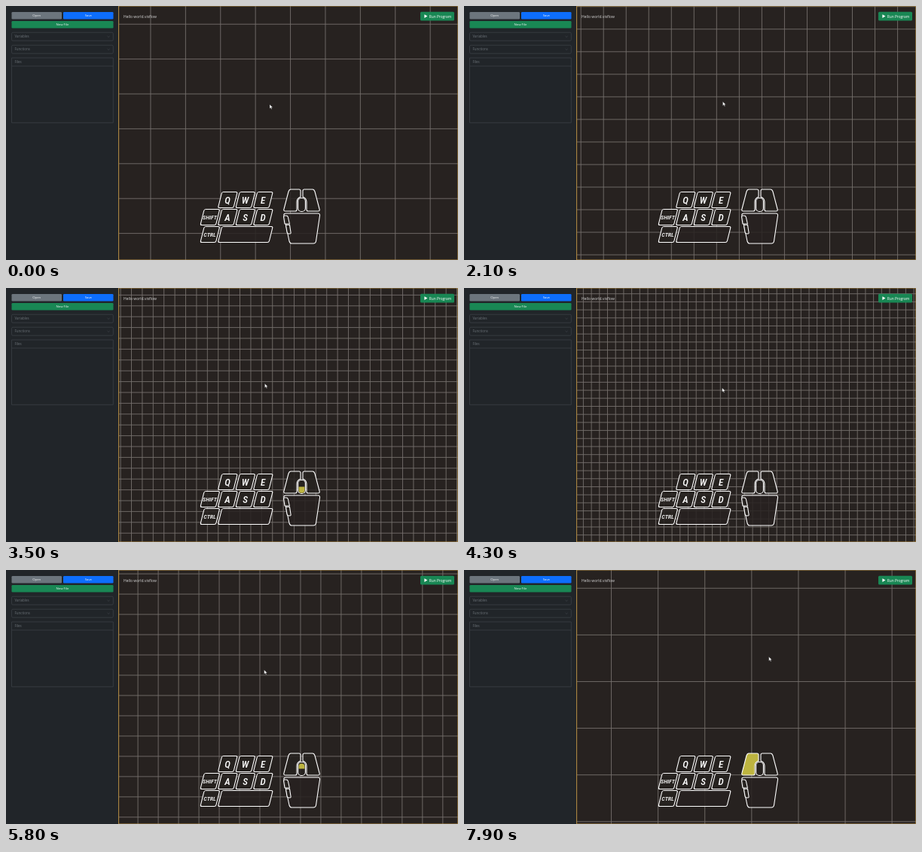
An HTML page that plays this animation: 600x338 px, repeating every 8000 ms.

```html
<!DOCTYPE html>
<html lang="en">
<head>
<meta charset="utf-8">
<title>Canvas zoom and pan</title>
<style>
html, body { margin: 0; width: 100%; height: 100%; overflow: hidden; background: #212529; }
svg { display: block; width: 600px; height: 338px; font-family: "Open Sans", "Noto Sans", sans-serif; }
.ui { font-size: 4.5px; fill: #6c7379; }
.btn { font-size: 4.3px; fill: #f4f6f7; text-anchor: middle; }
.box { fill: none; stroke: #3b4146; stroke-width: .8; }
.pad { fill: #272220; fill-opacity: .85; stroke: #fff; stroke-width: 1.1; stroke-linejoin: round; }
.cap { font-family: "Roboto Condensed", "Liberation Sans Narrow", "Open Sans", sans-serif;
  font-weight: 500; font-style: italic; font-stretch: 75%; fill: #fff; text-anchor: middle; }
.lit { fill: #bdb440; fill-opacity: 1; }
</style>
</head>
<body>
<svg viewBox="0 0 600 338">
  <rect width="150" height="338" fill="#212529"/>
  <rect x="7.5" y="8" width="66.5" height="9.5" rx="1.3" fill="#6c757d"/>
  <rect x="76" y="8" width="66.5" height="9.5" rx="1.3" fill="#0d6efd"/>
  <rect x="7.5" y="20" width="135" height="9.5" rx="1.3" fill="#198754"/>
  <g class="btn">
    <text x="40.7" y="14.3">Open</text>
    <text x="109.3" y="14.3">Save</text>
    <text x="75" y="26.3">New File</text>
  </g>
  <g class="box">
    <rect x="7.5" y="35.2" width="134.8" height="11" rx="1.5"/>
    <rect x="7.5" y="52.2" width="134.8" height="11" rx="1.5"/>
    <path d="M7.5 69H142.3V155.3H7.5ZM7.5 80H142.3"/>
    <path d="M134.5 40l1.6 1.5 1.6-1.5M134.5 57l1.6 1.5 1.6-1.5"/>
  </g>
  <g class="ui">
    <text x="11.5" y="42.4">Variables</text>
    <text x="11.5" y="59.4">Functions</text>
    <text x="11.5" y="76.2">Files</text>
  </g>

  <rect x="150" width="450" height="338" fill="#272220"/>
  <path id="grid" fill="none" stroke="#75706c" stroke-width=".9"/>
  <rect x="149.6" y="0" width="450.3" height="338" fill="none" stroke="#b78f45"/>
  <text x="156" y="15.6" font-size="5" fill="#d6d6d6">Hello world.visflow</text>
  <rect x="550" y="7.8" width="45" height="11.6" rx="1.5" fill="#198754"/>
  <path d="M555.4 11.2V16l4-2.4z" fill="#fff"/>
  <text x="561.8" y="15.5" font-size="4.8" fill="#fff">Run Program</text>

  <g id="keys"></g>
  <g class="pad">
    <path id="left" d="M378 244H389Q391 244 391 246V254Q386 256 386 261V271Q386 273 384 273H371Q368 273 369 270L375 247Q376 244 378 244Z"/>
    <use href="#left" id="right" transform="translate(785) scale(-1 1)"/>
    <path d="M372 276H414Q417 276 416.500 279L411.500 313Q411 316 408 316H379Q377 316 376 313L369 279Q368 276 372 276Z"/>
    <path d="M370 279H372Q374 279 374.400 281L376.400 290H370L368.600 281Q368.400 279 370 279Z"/>
    <path d="M371.400 291.300H376.500L378 301Q378.400 303 377 303H375Q373.500 303 373 301Z"/>
    <rect x="387.600" y="255.500" width="9.800" height="18" rx="4.500"/>
  </g>
  <path id="up" class="lit" d="M388.600 264.500V261.500Q388.600 257.500 392.500 257.500T396.400 261.500V264.500Z"/>
  <path id="down" class="lit" d="M388.600 264.500V269Q388.600 272.800 392.500 272.800T396.400 269V264.500Z"/>
  <path id="cursor" d="M0 0V5.400L1.300 4.200 2.300 6.300 3.200 5.900 2.200 3.900H4Z" fill="#fff" stroke="#222" stroke-width=".3"/>
</svg>
<script>
const LOOP = 8000, STEP = 100, START_GAP = 46.4;
const DRAG = { from: 7400, to: 7900, dx: 52, dy: -1.5 };

// Wheel bursts: each one brings the grid to a new spacing at a steady rate
const BURSTS = [
  { from: 700, to: 1200, gap: 36.5 },
  { from: 1600, to: 1900, gap: 32.8 },
  { from: 2000, to: 2500, gap: 21.1 },
  { from: 2600, to: 4200, gap: 10.7 },
  { from: 4400, to: 4800, gap: 14.35 },
  { from: 4900, to: 6100, gap: 33.3 },
  { from: 6200, to: 7000, gap: 62.1 },
];
const MOVES = [
  { from: 0, to: 600, dx: -6.5, dy: -3.7 },
  { from: 3600, to: 4200, dx: -.8, dy: 5.7 },
  { from: 7200, to: 7400, dx: 10, dy: -16 },
  DRAG,
];

const $ = id => document.getElementById(id);
const progress = ({ from, to }, t) => Math.min(1, Math.max(0, (t - from) / (to - from)));
const show = (id, on) => $(id).style.display = on ? "" : "none";

function addKey(label, col, row, cols = 1) {
  const x = 258 + col * 23.5, y = 247.5 + row * 23, w = cols * 23.5 - 3;
  const size = label.length > 1 ? 8 : 13;
  $("keys").innerHTML += `<rect class="pad" width="${w}" height="21" rx="2"
    transform="translate(${x + 5.2} ${y}) skewX(-14)"/>
    <text class="cap" font-size="${size}" x="${x + w / 2 + 2.3}" y="${y + 10.8 + size * .36}">${label}</text>`;
}
[["", "Q", "W", "E"], ["SHIFT", "A", "S", "D"], ["CTRL"]].forEach((keys, row) =>
  keys.forEach((label, col) => label && addKey(label, col, row)));
addKey("", 1, 2, 3);

const spacing = t => BURSTS.reduce((s, b) => s * (b.gap / s) ** progress(b, t), START_GAP);

function gridPath(t) {
  const s = spacing(t);
  // Zoom centre, and where it lies within its cell
  const [cx, px, cy, py] = t < 4300 ? [343, .255, 128, .237] : [342.5, .204, 133.5, .759];
  const first = (p, min) => p - Math.floor((p - min) / s) * s;
  let d = "";
  for (let x = first(cx - px * s + DRAG.dx * progress(DRAG, t), 150); x < 600; x += s) d += `M${x} 0V338`;
  for (let y = first(cy - py * s, 0); y < 338; y += s) d += `M150 ${y}H600`;
  return d;
}

function draw(time) {
  const t = Math.floor(time % LOOP / STEP) * STEP;
  $("grid").setAttribute("d", gridPath(t));

  let x = 350, y = 131;
  for (const m of MOVES) {
    x += m.dx * progress(m, t);
    y += m.dy * progress(m, t);
  }
  $("cursor").setAttribute("transform", `translate(${x} ${y})`);

  const burst = BURSTS.find(b => t > b.from + STEP && t < b.to);
  const zoomIn = burst && burst.gap > spacing(t);
  show("up", burst && zoomIn);
  show("down", burst && !zoomIn);
  $("left").style.fill = t >= DRAG.from ? "#bdb440" : "";
  $("left").style.fillOpacity = t >= DRAG.from ? 1 : "";
}

// The right button mirrors the left one's shape but never lights up
const right = $("left").cloneNode();
right.id = "right";
right.setAttribute("transform", "translate(785) scale(-1 1)");
$("right").replaceWith(right);

let start;
function tick(now) {
  start ??= now;
  draw(now - start);
  requestAnimationFrame(tick);
}
draw(0);
requestAnimationFrame(tick);
</script>
</body>
</html>
```
